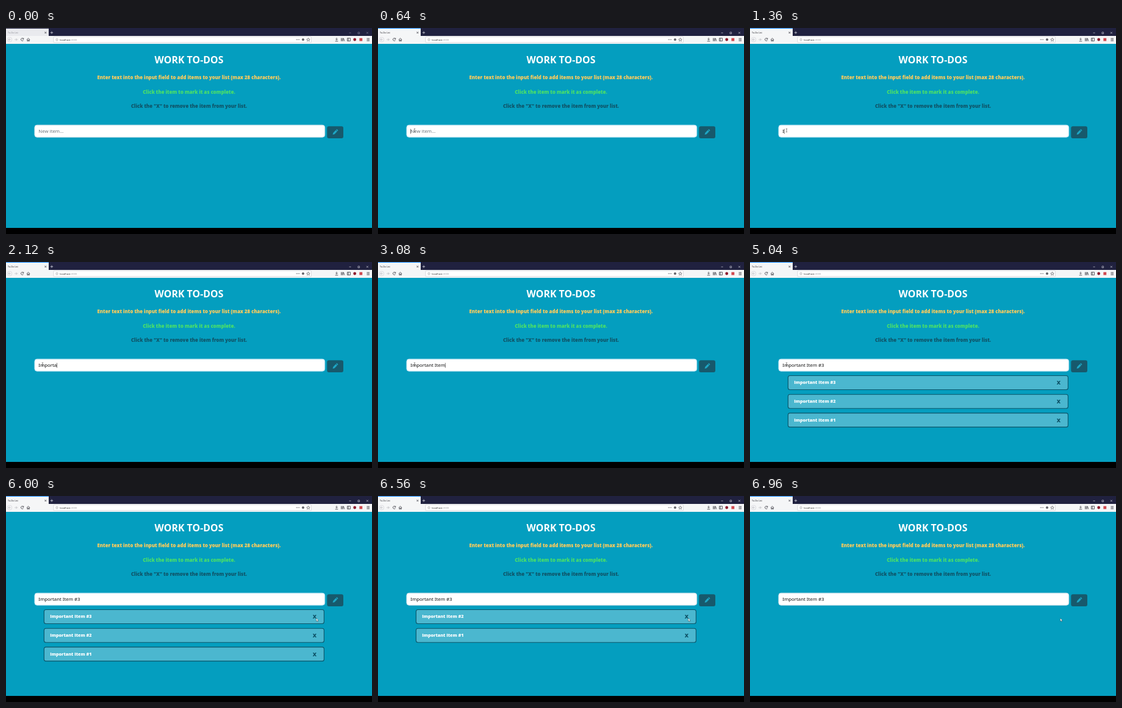
These frames come from a looping animation (600x338 px, 7000 ms). An HTML page:

```html
<!DOCTYPE html>
<html lang="en">
<head>
<meta charset="utf-8">
<title>To-Do List</title>
<style>
  html, body { margin: 0; width: 100%; height: 100%; overflow: hidden; background: #000; }
  svg { display: block; width: 100vw; height: 100vh; }
  text { font-family: "Open Sans", sans-serif; white-space: pre; }
  .title { font-weight: 700; font-size: 15.9px; fill: #fff; text-anchor: middle; }
  .hint { font-weight: 800; font-size: 7.82px; text-anchor: middle; }
  .field { font-family: "Noto Sans", sans-serif; font-size: 7.8px; }
  .label { font-weight: 800; font-size: 7.2px; fill: #fff; }
  .remove { font-weight: 800; font-size: 8.8px; fill: #0d5165; text-anchor: middle; }
  .line { fill: none; stroke: #3c3c44; stroke-width: .8; }
  .faint { stroke: #b9b9bf; }
</style>
</head>
<body>
<svg viewBox="0 0 600 338" preserveAspectRatio="none">
  <!-- browser window -->
  <rect width="600" height="13.5" fill="#20213f"/>
  <rect id="tab" y="1" width="70" height="13" fill="#f5f6f7"/>
  <rect id="tabLine" width="70" height="1" fill="#0a84ff"/>
  <text id="tabName" x="3" y="9.2" font-size="3.65">To-Do List</text>
  <path class="line" d="M63.4 6.2l2.8 2.8m0-2.8l-2.8 2.8"/>
  <path d="M72.8 7.6h4.4m-2.2-2.2v4.4" stroke="#e4e4ec" stroke-width=".7"/>
  <path id="controls" d="M562.6 8h3M577 6.9h2.6v2.6h-2.6zM591 6.5l2.8 2.8m0-2.8l-2.8 2.8" fill="none" stroke-width=".6"/>

  <rect y="13" width="600" height="13" fill="#f5f6f7"/>
  <rect x="78" y="14.4" width="422.5" height="9.4" rx=".8" fill="#fff" stroke="#c8c8cd" stroke-width=".6"/>
  <circle class="line faint" cx="6" cy="19" r="3.8" style="stroke-width:.4"/>
  <path class="line faint" d="M8 19H4m1.8-1.8L4 19l1.8 1.8M14.2 19h4.2m-1.9-1.9l1.9 1.9-1.9 1.9"/>
  <path class="line" d="M28.5 17.6A2.2 2.2 0 1 0 28.6 20M28.8 16.4v1.8H27"/>
  <path class="line" d="M34 19.2l2.6-2.5 2.6 2.5M34.9 18.8v2.6h1.2v-1.6h1v1.6h1.2v-2.6"/>
  <circle class="line" cx="83.5" cy="19.1" r="1.9" style="stroke-width:.4;stroke:#77777d"/>
  <path d="M83.5 18.8v1.3m0-2.1v.4" stroke="#77777d" stroke-width=".5"/>
  <text x="88.3" y="20.6" font-size="4.15" fill="#222">localhost<tspan fill="#99999f">:3000</tspan></text>
  <path d="M475.7 19h5.6" stroke="#55555c" stroke-width="1.2" stroke-dasharray="1.3 .8"/>
  <circle cx="487" cy="19" r="2.1" fill="#66666d"/>
  <path class="line" d="M495.5 16.4l.8 1.8 2 .2-1.5 1.3.5 1.9-1.8-1-1.8 1 .5-1.9-1.5-1.3 2-.2z" style="stroke-width:.6"/>
  <path class="line" d="M542 16v3.6m-1.6-1.5l1.6 1.6 1.6-1.6M539.7 21.6h4.6"/>
  <path class="line" d="M549.6 16.6v5m1.5-5v5m1.5-5v5m.8-4.8l1.6 4.8"/>
  <path class="line" d="M559.5 16.7h5v4.6h-5zM561.3 16.7v4.6"/>
  <circle cx="571.7" cy="19" r="2.4" fill="#8f1f31"/>
  <rect x="579.4" y="16.6" width="4.8" height="4.8" fill="#d04a50"/>
  <path class="line" d="M591.4 17.2h4.6m-4.6 1.9h4.6m-4.6 1.9h4.6"/>

  <!-- page -->
  <rect y="26" width="600" height="302" fill="#049ebf"/>
  <text class="title" x="300" y="58.1">WORK TO-DOS</text>
  <text class="hint" x="300" y="83.7" fill="#ffcc5c">Enter text into the input field to add items to your list (max 28 characters).</text>
  <text class="hint" x="300" y="107.6" fill="#4be068">Click the item to mark it as complete.</text>
  <text class="hint" x="300" y="131.4" fill="#0f5468">Click the "X" to remove the item from your list.</text>

  <rect id="box" x="46.9" y="159.2" width="475.8" height="20" rx="4" fill="#fff" stroke-width="1"/>
  <text id="value" class="field" x="53.3" y="172.4"></text>
  <path id="caret" d="M0 165.6v8" stroke="#111" stroke-width=".6"/>
  <rect x="526.3" y="161.2" width="26.7" height="19.8" rx="3" fill="#17596c"/>
  <path transform="translate(539.6 170.9) rotate(45)" fill="#1ea6c4"
    d="M-1.6-3.1H1.6V3L0 5.7-1.6 3ZM-1.6-3.8V-4.8Q-1.6-5.5-.9-5.5H.9Q1.6-5.5 1.6-4.8V-3.8Z"/>

  <g id="list"></g>

  <path id="beam" d="M-1.2-2.7H-.3L0-2.4.3-2.7H1.2M0-2.4V2.4M-1.2 2.7H-.3L0 2.4.3 2.7H1.2" fill="none" stroke="#222" stroke-width=".55"/>
  <path id="arrow" d="M0 0V5L1.2 4 2 5.7 2.8 5.3 2 3.7H3.5Z" fill="#fff" stroke="#222" stroke-width=".35"/>
</svg>
<script>
const LOOP = 7000, FOCUS = 640, BLUR = 6240;
const $ = id => document.getElementById(id);
const show = (el, on) => el.setAttribute('visibility', on ? 'visible' : 'hidden');

// Typing: [time, field text]
const keys = [];
const phrase = 'Important Item';
for (let i = 1; i <= phrase.length; i++) keys.push([1320 + (i - 1) * 124, phrase.slice(0, i)]);
keys.push(
  [3160, phrase + ' '], [3340, phrase + ' #'], [3480, phrase + ' #1'],
  [3920, phrase + ' #'], [4080, phrase + ' #2'],
  [4400, phrase + ' #'], [4480, phrase + ' #3']
);

// List: [time, item numbers from top to bottom]
const lists = [
  [0, []], [3720, [1]], [4280, [2, 1]], [4960, [3, 2, 1]],
  [6240, [2, 1]], [6600, [1]], [6880, []]
];

// Mouse: [time, x, y]
const mouse = [
  [360, 0, 150], [620, 60, 168], [5200, 60, 168],
  [5480, 300, 186], [5760, 508.7, 200.6], [LOOP, 508.7, 200.6]
];

const latest = (steps, t) => steps.filter(s => s[0] <= t).pop();

function mouseAt(t) {
  const i = mouse.findIndex(p => p[0] > t);
  const [t0, x0, y0] = mouse[i - 1], [t1, x1, y1] = mouse[i];
  const k = (t - t0) / (t1 - t0), e = k * k * (3 - 2 * k);
  return [x0 + (x1 - x0) * e, y0 + (y1 - y0) * e];
}

function row(n, i) {
  const y = 186.5 + i * 30.7;
  return `<rect x="62.4" y="${y}" width="459" height="23" rx="3" fill="#4bb7cf" stroke="#0b5569" stroke-width="1.1"/>
    <text class="label" x="72.2" y="${y + 13.8}">Important Item #${n}</text>
    <text class="remove" x="506" y="${y + 14.8}">X</text>`;
}

let shownList = '';
function drawList(items) {
  const key = items.join();
  if (key === shownList) return;
  shownList = key;
  $('list').innerHTML = items.map(row).join('');
}

function draw(t) {
  const active = t >= 480;
  $('tabName').setAttribute('fill', active ? '#15151c' : '#85858c');
  $('tab').setAttribute('fill', active ? '#f5f6f7' : '#e9eaee');
  show($('tabLine'), active);
  $('controls').setAttribute('stroke', active ? '#e8e8f0' : '#8c8ca2');

  const focused = t >= FOCUS && t < BLUR;
  const key = latest(keys, t);
  const value = $('value');
  value.textContent = key ? key[1] : 'New item...';
  value.setAttribute('fill', key ? '#111' : '#6c757d');
  $('box').setAttribute('stroke', focused ? '#a9dcee' : '#c3dce6');

  const since = t - (key ? key[0] : FOCUS);
  const caretX = 53.6 + (key ? value.getComputedTextLength() : 0);
  $('caret').setAttribute('transform', `translate(${caretX} 0)`);
  show($('caret'), focused && since % 1000 < 500);

  drawList(latest(lists, t)[1]);

  const moving = t >= mouse[0][0];
  const [x, y] = moving ? mouseAt(t) : [0, 0];
  const overField = x > 46 && x < 523 && y > 159 && y < 180;
  for (const id of ['beam', 'arrow']) {
    $(id).setAttribute('transform', `translate(${x} ${y})`);
    show($(id), moving && overField === (id === 'beam'));
  }
}

const start = performance.now();
function tick() {
  draw((performance.now() - start) % LOOP);
  requestAnimationFrame(tick);
}
tick();
</script>
</body>
</html>
```
